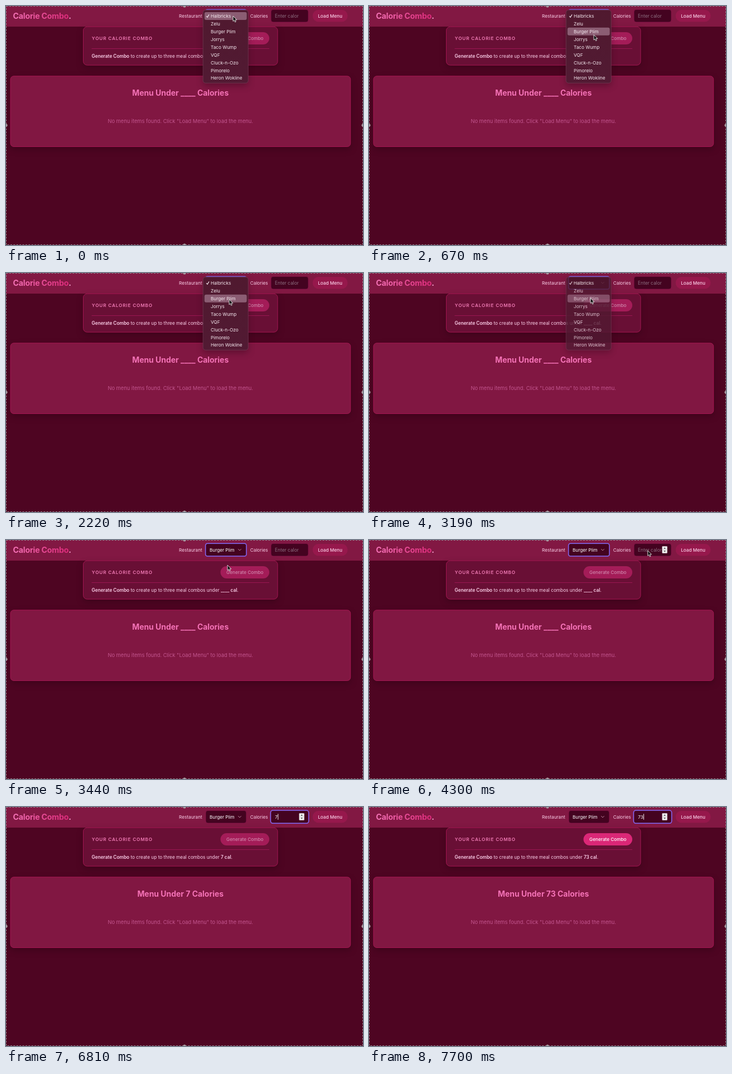
Write an HTML page that moves like this. It is 640 px wide and 429 px high and loops after 8000 ms.

```html
<!DOCTYPE html>
<html lang="en">
<head>
<meta charset="utf-8">
<title>Calorie Combo</title>
<style>
  html, body { margin: 0; width: 100%; height: 100%; overflow: hidden; background: #4e0522; }
  svg { display: block; width: 640px; height: 429px; }
  text { font: 400 8.2px Inter, "Open Sans", sans-serif; fill: #fbcfe8; white-space: pre; }
  .brand { font-size: 14.2px; font-weight: 700; letter-spacing: -.22px; fill: url(#brand); }
  .dot { fill: #f9a8d4; }
  .medium { font-weight: 500; }
  .bold { font-weight: 600; }
  .caps { font-weight: 600; letter-spacing: .85px; fill: #ee79b3; }
  .note { font-size: 8.28px; }
  .heading { font-size: 13.95px; font-weight: 700; fill: #f472b6; }
  .empty { font-size: 9.31px; fill: #c2558e; }
  .hint { font-size: 8.4px; fill: #8d6f80; }
  .white { fill: #fff; }
  .item { fill: #f6eaf0; }
  .mid { text-anchor: middle; }
  .card { stroke: #b5195b; stroke-width: .8; }
  .shadow { filter: drop-shadow(0 5px 6px rgba(30, 0, 12, .32)); }
  .field { fill: #440320; stroke: #8f1650; stroke-width: .7; }
  .ring { fill: none; stroke: #7d68f2; stroke-width: 1.5; }
</style>
</head>
<body>
<svg viewBox="0 0 640 429" xmlns="http://www.w3.org/2000/svg">
  <defs>
    <linearGradient id="brand" gradientUnits="userSpaceOnUse" x1="13" y1="0" x2="115" y2="0">
      <stop offset="0" stop-color="#f472b6"/><stop offset="1" stop-color="#db2777"/>
    </linearGradient>
    <linearGradient id="glass" x1="0" y1="0" x2="0" y2="1">
      <stop offset="0" stop-color="#50192f"/><stop offset="1" stop-color="#521a33"/>
    </linearGradient>
    <clipPath id="field"><rect x="480" y="6" width="44.5" height="23"/></clipPath>
  </defs>

  <rect width="640" height="429" fill="#4e0522"/>
  <rect width="640" height="37" fill="#821843"/>
  <text class="brand" x="12.5" y="22.6">Calorie Combo<tspan class="dot">.</tspan></text>

  <g class="shadow">
    <rect class="card" x="138.5" y="37.2" width="348.5" height="69" rx="7" fill="#690f35"/>
  </g>
  <text class="caps" x="153.8" y="61">YOUR CALORIE COMBO</text>
  <rect id="make" x="384.5" y="47" width="87.5" height="22" rx="11"/>
  <text id="makeText" class="medium mid" x="428.3" y="61">Generate Combo</text>
  <path d="M153.5 76.5H472" stroke="#a8195a" stroke-width=".8"/>
  <text class="note" x="153.6" y="93"><tspan class="bold">Generate Combo</tspan> to create up to three meal combos under <tspan class="bold" id="limit"></tspan>.</text>

  <g class="shadow">
    <rect class="card" x="8" y="125.8" width="609.7" height="126.7" rx="6" fill="#811742"/>
  </g>
  <text id="heading" class="heading mid" x="312.7" y="160.7"></text>
  <text class="empty mid" x="312.7" y="210">No menu items found. Click "Load Menu" to load the menu.</text>

  <text x="310.1" y="20.6">Restaurant</text>
  <rect class="field" x="358" y="6.3" width="72.8" height="22.7" rx="4"/>
  <text id="choice" class="white" x="365" y="20.6"></text>
  <path d="M416.2 16.2l2.7 2.7 2.7-2.7" fill="none" stroke="#d295b2" stroke-width=".9"/>
  <rect id="selectRing" class="ring" x="357.6" y="6.2" width="73.4" height="22.9" rx="3.5"/>

  <text x="437.8" y="20.6">Calories</text>
  <rect class="field" x="475" y="6.3" width="67" height="22.7" rx="4"/>
  <g clip-path="url(#field)">
    <text id="hint" class="hint" x="482" y="20.6">Enter calories</text>
    <text id="typed" class="white" x="482.3" y="20.6"></text>
  </g>
  <rect id="inputRing" class="ring" x="474.3" y="6" width="68.4" height="23.3" rx="4"/>
  <rect id="caret" y="12.3" width=".9" height="10.5" fill="#fff"/>
  <g id="spinner">
    <rect x="525.5" y="11.3" width="9.2" height="12.4" rx="1" fill="#efefef"/>
    <path d="M528.2 15.8l1.9-2.4 1.9 2.4zM528.2 19.2l1.9 2.4 1.9-2.4z" fill="#444"/>
    <path d="M525.5 17.5h9.2" stroke="#c9c9c9" stroke-width=".5"/>
  </g>

  <rect x="549.8" y="7" width="62.7" height="21.3" rx="10.6" fill="#96184c"/>
  <text class="medium mid" x="581" y="20.6">Load Menu</text>

  <g id="menu">
    <rect class="shadow" x="353.2" y="7.1" width="81" height="131.2" rx="4.5" fill="url(#glass)" stroke="#75405a" stroke-width=".7"/>
    <rect id="glow" x="355.8" width="75.8" height="13.9" rx="3" fill="#8b5d73"/>
    <path d="M359.2 18.2l1.8 2.2 3-5" fill="none" stroke="#f6eaf0" stroke-width="1.1"/>
  </g>

  <rect x=".5" y=".5" width="639" height="428" fill="none" stroke="#988690" stroke-dasharray="3 2.4"/>
  <g fill="#a79ba1">
    <circle cx="320" cy="0" r="2.6"/><circle cx="320" cy="429" r="2.6"/>
    <circle cx="0" cy="214" r="2.6"/><circle cx="640" cy="214" r="2.6"/>
  </g>

  <path id="pointer" d="M0 0V9.4L2.1 7.5 3.6 10.9 5.2 10.2 3.8 6.9H6.8Z" fill="#111" stroke="#fff" stroke-width=".8" stroke-linejoin="round"/>
</svg>
<script>
const LOOP = 8000, ROW = 13.93, FIRST = 18;
const places = ["Halbricks", "Zelu", "Burger Plim", "Jorrys", "Taco Wump",
  "VQF", "Cluck-n-Ozo", "Pimorelo", "Heron Wokline"];

// time, x, y
const path = [
  [0, 407, 18], [330, 407, 18], [520, 406, 32], [720, 402, 58], [880, 399.5, 73],
  [1000, 399, 74], [1110, 398.3, 69], [1150, 398, 59], [1240, 399, 50], [1330, 400, 47.3],
  [2220, 400, 47.3], [2420, 398.5, 45.5], [2600, 395.6, 43.5], [2780, 397, 45],
  [3740, 397, 45], [3780, 403, 44], [3870, 455, 38], [3960, 487, 35.5],
  [4110, 487, 35.5], [4150, 488, 33], [4300, 499.7, 19], [4440, 501, 18.3]
];
const fade = [[3070, 1], [3190, .82], [3440, 0]];
// time, caret shown
const blinks = [[0, 0], [4630, 1], [5110, 0], [5630, 1], [6330, 0], [6810, 1], [7330, 0], [7700, 1]];

const el = id => document.getElementById(id);
const show = (id, on) => el(id).setAttribute("visibility", on ? "visible" : "hidden");
const set = (id, text) => { if (el(id).textContent !== text) el(id).textContent = text; };

function sample(track, t) {
  const i = track.findIndex(k => k[0] > t);
  if (i < 0) return track[track.length - 1].slice(1);
  if (i === 0) return track[0].slice(1);
  const a = track[i - 1], b = track[i], u = (t - a[0]) / (b[0] - a[0]);
  return a.slice(1).map((v, n) => v + (b[n + 1] - v) * u);
}

places.forEach((name, i) => {
  const item = document.createElementNS("http://www.w3.org/2000/svg", "text");
  item.setAttribute("class", "item");
  item.setAttribute("x", 367);
  item.setAttribute("y", FIRST + 3 + i * ROW);
  item.textContent = name;
  el("menu").append(item);
});

function draw(t) {
  const [x, y] = sample(path, t);
  const [alpha] = sample(fade, t);
  const focused = t >= 4630;
  const typed = t < 5810 ? "" : t < 7700 ? "7" : "73";
  const amount = typed || "____";
  const ready = typed.length > 1;

  el("pointer").setAttribute("transform", `translate(${x} ${y})`);
  show("pointer", !typed);

  const row = Math.max(0, Math.min(places.length - 1, Math.round((y - FIRST) / ROW)));
  el("glow").setAttribute("y", FIRST - 7 + row * ROW);
  el("menu").setAttribute("opacity", alpha);
  set("choice", places[t < 3350 ? 0 : 2]);
  show("selectRing", !focused);

  show("inputRing", focused);
  show("spinner", focused || (x > 475 && y < 29));
  show("hint", !typed);
  set("typed", typed);
  show("caret", blinks.filter(b => b[0] <= t).pop()[1]);
  el("caret").setAttribute("x", 482.6 + typed.length * 4.7);

  set("limit", amount + " cal");
  set("heading", `Menu Under ${amount} Calories`);
  el("make").setAttribute("fill", ready ? "#db2777" : "#a41c58");
  el("makeText").style.fill = ready ? "#fff" : "#cf86ab";
}

const start = performance.now();
function tick() {
  draw((performance.now() - start) % LOOP);
  requestAnimationFrame(tick);
}
tick();
</script>
</body>
</html>
```
